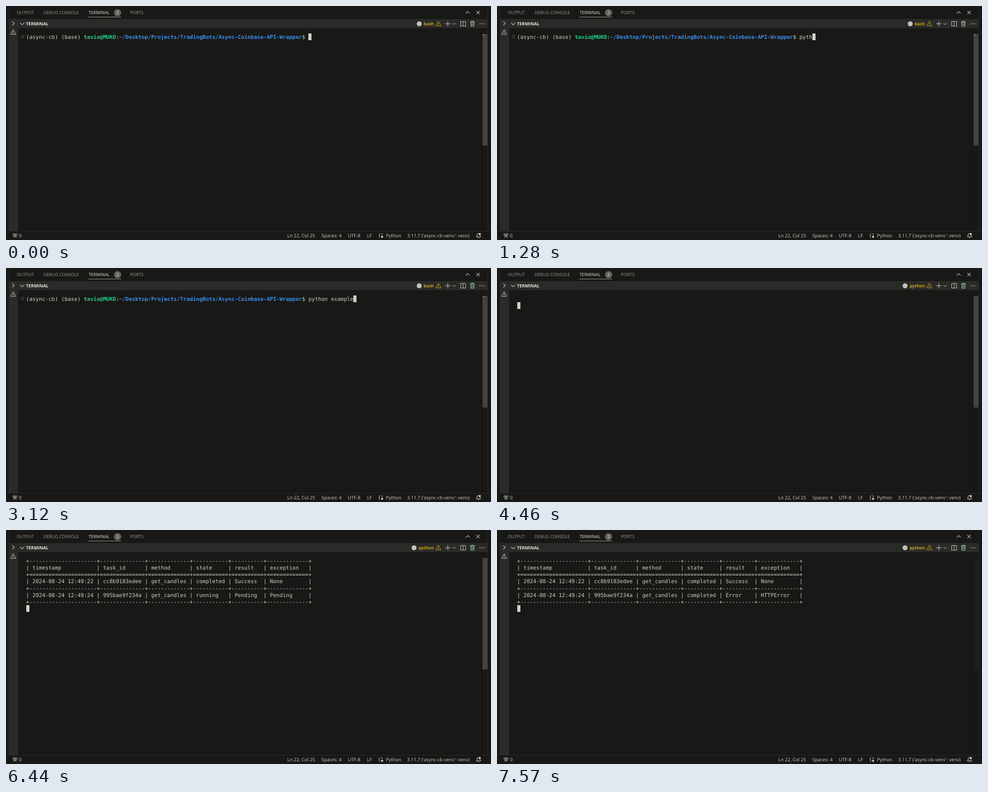
An HTML page with a canvas that plays this animation: 1078x520 px, repeating every 8 s.

```html
<!DOCTYPE html>
<html lang="en">
<head>
<meta charset="utf-8">
<title>Terminal session</title>
<style>
  html, body { margin: 0; width: 100%; height: 100%; overflow: hidden; background: #181816; }
  canvas { display: block; }
</style>
</head>
<body>
<canvas id="stage" width="1078" height="520"></canvas>
<script>
const ctx = document.getElementById('stage').getContext('2d');
const LOOP = 8000;
const CELL = 7.133, ROW = 15.15, LEFT = 44.5, TOP = 61;
const MONO = '"DejaVu Sans Mono", monospace';
const UI = '"Open Sans", sans-serif';
const C = {
  bg: '#181816', bar: '#2a2a28', line: '#2b2b29', text: '#cfcdc2', bright: '#e2e2dc',
  dim: '#9c9c97', icon: '#cfcfca', green: '#23d18b', blue: '#3b8eea', amber: '#c9a51c',
  cursor: '#d0d0cb', thumb: '#434341'
};

const PROMPT = [
  ['(async-cb) (base) ', C.text],
  ['tavio@MUKO', C.green, true],
  [':', C.text],
  ['~/Desktop/Projects/TradingBots/Async-Coinbase-API-Wrapper', C.blue, true],
  ['$ ', C.text]
];
const COMMAND = 'python example.py';
const KEYS = [1000, 1090, 1180, 1280, 1380, 1520, 1670, 1800, 1960,
  2260, 2740, 2880, 2940, 3120, 3420, 3770, 3870];
const T = { enter: 4270, title: 4340, clear: 4460, first: 4640, firstDone: 4840, second: 6440, secondDone: 6740 };
const FADE = 820;

const HEADER = ['timestamp', 'task_id', 'method', 'state', 'result', 'exception'];
const FIRST = ['2024-08-24 12:49:22', 'cc8b9183edee', 'get_candles'];
const SECOND = ['2024-08-24 12:49:24', '995bae9f234a', 'get_candles'];
const PENDING = ['running', 'Pending', 'Pending'];

function rect(x, y, w, h, color) {
  ctx.fillStyle = color;
  ctx.fillRect(x, y, w, h);
}

function path(points, color = C.icon, width = 1, close = false) {
  ctx.beginPath();
  points.forEach(([x, y]) => ctx.lineTo(x, y));
  if (close) ctx.closePath();
  ctx.strokeStyle = color;
  ctx.lineWidth = width;
  ctx.stroke();
}

function disc(x, y, r, color) {
  ctx.beginPath();
  ctx.arc(x, y, r, 0, 7);
  ctx.fillStyle = color;
  ctx.fill();
}

function arc(x, y, r, from, to, color = C.icon, width = 1) {
  ctx.beginPath();
  ctx.arc(x, y, r, from, to);
  ctx.strokeStyle = color;
  ctx.lineWidth = width;
  ctx.stroke();
}

function label(text, x, y, size, color, weight = 400, align = 'left') {
  ctx.font = `${weight} ${size}px ${UI}`;
  ctx.textAlign = align;
  ctx.fillStyle = color;
  ctx.fillText(text, x, y);
}

// Terminal text sits on a fixed character grid.
function cells(text, col, row, color = C.text, bold = false) {
  ctx.font = `${bold ? 700 : 400} 11.85px ${MONO}`;
  ctx.textAlign = 'left';
  ctx.fillStyle = color;
  [...text].forEach((ch, i) => {
    if (ch !== ' ') ctx.fillText(ch, LEFT + (col + i) * CELL, TOP + row * ROW + 12);
  });
}

function cursor(col, row) {
  rect(Math.round(LEFT + col * CELL), Math.round(TOP + row * ROW), 7, 15, C.cursor);
}

function warning(x, y, color) {
  path([[x, y - 5.5], [x + 5.8, y + 5], [x - 5.8, y + 5]], color, 1, true);
  path([[x, y - 1.8], [x, y + 1.8]], color, 1.1);
  rect(x - 0.6, y + 2.6, 1.2, 1.2, color);
}

function drawTabs() {
  label('OUTPUT', 24, 18, 9.6, C.dim);
  label('DEBUG CONSOLE', 83.5, 18, 9.6, C.dim);
  label('TERMINAL', 183.5, 18, 9.7, C.bright);
  label('PORTS', 275.5, 18, 9.7, C.dim);
  rect(183, 24, 73, 1, '#a3a39e');
  disc(248, 15, 8, '#636360');
  label('2', 248, 18.3, 9, '#f4f4ee', 400, 'center');
  path([[1022, 16.5], [1026.2, 12.2], [1030.4, 16.5]], C.icon, 1.1);
  path([[1045.5, 10.8], [1053, 18.2]], C.icon, 1.1);
  path([[1053, 10.8], [1045.5, 18.2]], C.icon, 1.1);
}

function drawHeader(python) {
  path([[14, 34.5], [18.5, 38.7], [14, 43]], C.icon, 1.1);
  path([[31.5, 37.5], [36, 42], [40.5, 37.5]], C.icon, 1.1);
  label('TERMINAL', 44.5, 42.7, 9.7, C.bright, 700);
  warning(16, 58, C.icon);

  disc(python ? 907 : 918.5, 39.5, 5.5, '#c2c2bc');
  label(python ? 'python' : 'bash', 951, 42.8, 9.5, C.amber, 700, 'right');
  warning(961, 39, C.amber);
  path([[976, 39.5], [988, 39.5]], C.icon, 1.1);
  path([[982, 33.5], [982, 45.5]], C.icon, 1.1);
  path([[992.5, 38], [996, 41.3], [999.5, 38]]);
  ctx.strokeRect(1010.5, 34.5, 11, 10);
  path([[1016, 34.5], [1016, 44.5]]);

  const bin = '#a6d2ac';
  path([[1031.5, 35.5], [1042, 35.5]], bin, 1.2);
  path([[1034.8, 35], [1034.8, 33.5], [1038.7, 33.5], [1038.7, 35]], bin);
  path([[1033, 36], [1033.5, 45], [1040, 45], [1040.5, 36]], bin, 1.2);
  path([[1035.6, 37.5], [1035.6, 43]], bin);
  path([[1038, 37.5], [1038, 43]], bin);
  [1053.5, 1058, 1062.5].forEach(x => disc(x, 39.5, 1, C.icon));
}

function drawStatus() {
  arc(20, 508, 2.2, 2.4, 7);
  arc(20, 508, 4.6, 2.4, 3.9);
  arc(20, 508, 4.6, -0.75, 0.75);
  path([[17, 515], [20, 507.5], [23, 515]]);
  path([[18, 512.5], [22, 512.5]]);
  [['0', 28.8], ['Ln 22, Col 25', 625.3], ['Spaces: 4', 701], ['UTF-8', 759.7],
    ['LF', 802.5], ['Python', 844.5], ["3.11.7 ('async-cb-venv': venv)", 891.5]
  ].forEach(([text, x]) => label(text, x, 513.7, 10.4, C.icon));

  path([[831.5, 505.5], [830, 506], [830, 509], [828.5, 510], [830, 511], [830, 514], [831.5, 514.5]]);
  path([[834.5, 505.5], [836, 506], [836, 509], [837, 510]]);
  disc(836, 513, 2.3, C.icon);

  path([[1049, 513], [1045.5, 513], [1047, 510.5], [1047, 508], [1048.3, 506], [1050.5, 505.3]], C.icon, 1.1);
  path([[1054, 510], [1055, 513], [1049, 513]], C.icon, 1.1);
  arc(1050.3, 513.5, 1.6, 0, Math.PI);
  disc(1053, 507, 2.4, C.icon);
}

function drawFrame() {
  rect(0, 0, 1078, 520, C.bg);
  rect(6, 0, 1, 500, C.line);
  rect(7, 29, 1063, 20, C.bar);
  rect(7, 49, 20, 451, C.bar);
  rect(0, 461, 6, 1, C.line);
  rect(0, 482, 6, 1, C.line);
  rect(1070, 0, 1, 500, C.line);
  rect(0, 500, 1078, 1, C.line);
  rect(1058, 61, 1, 439, '#0d0d0c');
  rect(1059, 61, 11, 1, '#0d0d0c');
}

function drawThumb(t) {
  const gone = Math.min(1, Math.max(0, (t - T.secondDone) / FADE));
  ctx.globalAlpha = 1 - 0.86 * gone;
  rect(1059, 62, 11, 248, C.thumb);
  ctx.globalAlpha = 1;
  if (t < T.title) disc(1061.5, 63.5, 1.8, '#777773');
}

function drawPrompt(t) {
  let col = 0;
  for (const [text, color, bold] of PROMPT) {
    cells(text, col, 0, color, bold);
    col += text.length;
  }
  const typed = KEYS.filter(at => at <= t).length;
  cells(COMMAND.slice(0, typed), col, 0);
  if (t < T.title) arc(36.5, 68, 3, 0, 7, '#62625f');
  if (t < T.enter) cursor(col + typed, 0);
  else cursor(0, 1);
}

function gridTable(rows) {
  const widths = HEADER.map((head, i) =>
    Math.max(head.length + 2, ...rows.map(r => r[i].length)) + 2);
  const rule = ch => '+' + widths.map(w => ch.repeat(w)).join('+') + '+';
  const line = row => '|' + row.map((s, i) => (' ' + s).padEnd(widths[i])).join('|') + '|';
  return [rule('-'), line(HEADER), rule('='), ...rows.flatMap(r => [line(r), rule('-')])];
}

function drawTable(t) {
  const rows = [[...FIRST, ...(t < T.firstDone ? PENDING : ['completed', 'Success', 'None'])]];
  if (t >= T.second) {
    rows.push([...SECOND, ...(t < T.secondDone ? PENDING : ['completed', 'Error', 'HTTPError'])]);
  }
  const lines = gridTable(rows);
  lines.forEach((text, row) => cells(text, 0, row));
  cursor(0, lines.length);
}

function draw(t) {
  ctx.textRendering = 'geometricPrecision';
  drawFrame();
  drawTabs();
  drawHeader(t >= T.title);
  drawStatus();
  drawThumb(t);
  if (t < T.clear) drawPrompt(t);
  else if (t < T.first) cursor(0, 1);
  else drawTable(t);
}

const start = performance.now();
function tick() {
  draw((performance.now() - start) % LOOP);
  requestAnimationFrame(tick);
}
tick();
</script>
</body>
</html>
```
